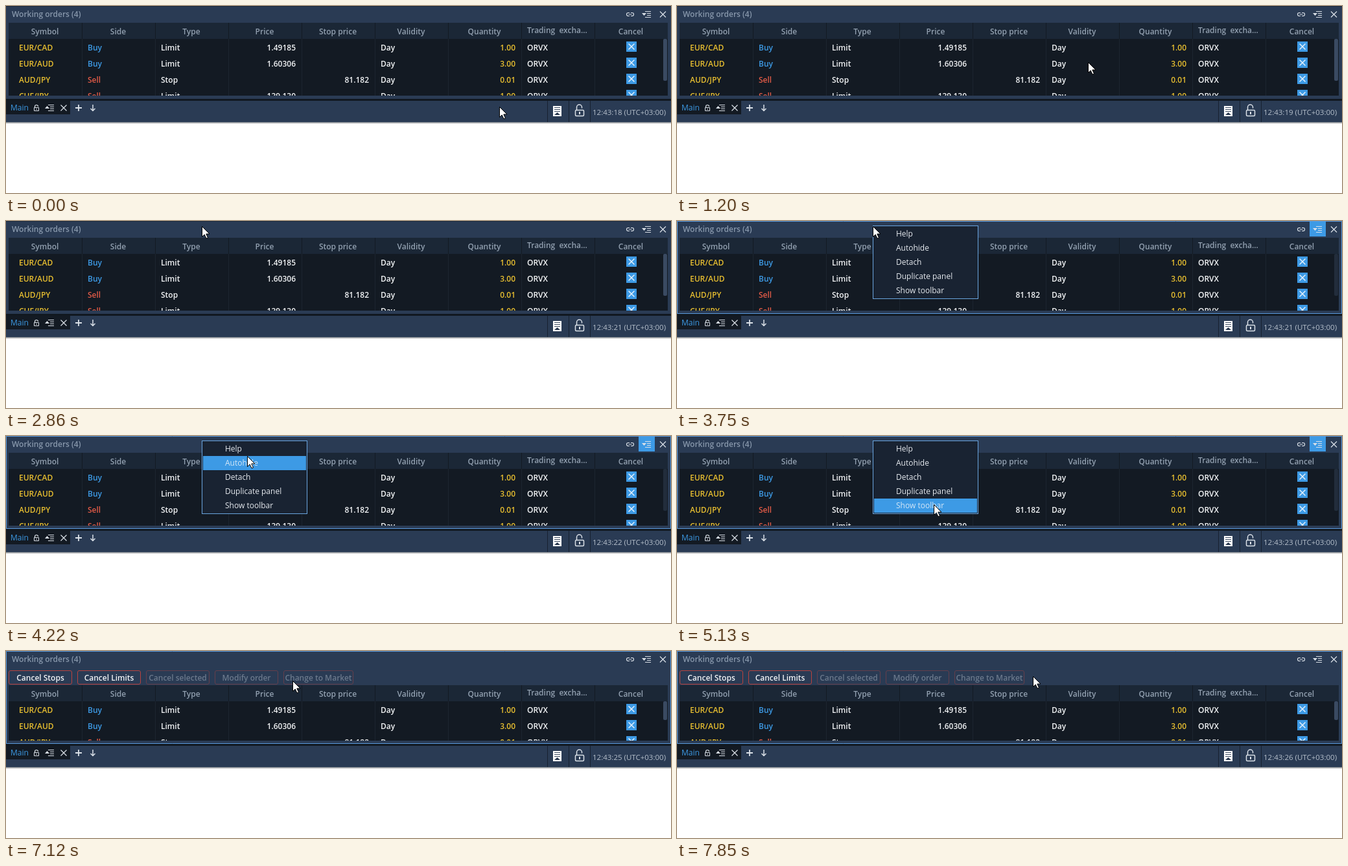
An HTML page with a canvas that plays this animation: 1026 px wide and 290 px high, repeating every 8 s.

```html
<!DOCTYPE html>
<html lang="en">
<head>
<meta charset="utf-8">
<title>Working orders</title>
<style>
  html, body { margin: 0; width: 100%; height: 100%; overflow: hidden; background: #fff; }
  canvas { display: block; }
</style>
</head>
<body>
<canvas id="stage" width="1026" height="290"></canvas>
<script>
const ctx = document.getElementById('stage').getContext('2d');
const LOOP = 8000;
const BOLD = '600 12px "Open Sans", sans-serif';
const REGULAR = '500 12px "Open Sans", sans-serif';
const BAR = '#2a3b54', DARK = '#131a23', HEAD = '#1b2736', BLUE = '#3d9ae5';
const WHITE = '#f2f4f6', YELLOW = '#e8bf30', RED = '#e25b47', ICON = '#dbe1e8';
const TABLE_BOTTOM = 139;

const COLUMNS = ['Symbol', 'Side', 'Type', 'Price', 'Stop price', 'Validity', 'Quantity', 'Trading  excha...', 'Cancel'];
const CELL_X = [20, 126, 239, 447, 560, 578, 786, 804];
const RIGHT_ALIGNED = [3, 4, 6];
const ORDERS = [
  ['EUR/CAD', 'Buy', 'Limit', '1.49185', '', 'Day', '1.00', 'ORVX'],
  ['EUR/AUD', 'Buy', 'Limit', '1.60306', '', 'Day', '3.00', 'ORVX'],
  ['AUD/JPY', 'Sell', 'Stop', '', '81.182', 'Day', '0.01', 'ORVX'],
  ['CHF/JPY', 'Sell', 'Limit', '139.130', '', 'Day', '1.00', 'ORVX']
];
const MENU = ['Help', 'Autohide', 'Detach', 'Duplicate panel', 'Show toolbar'];
const BUTTONS = [
  ['Cancel Stops', 4, 98, true], ['Cancel Limits', 110, 98, true],
  ['Cancel selected', 216, 98, false], ['Modify order', 322, 98, false],
  ['Change to Market', 428, 108, false]
];

// Pointer path: time, x, y
const PATH = [
  [840, 761, 156], [1200, 634, 87], [1640, 510, 34], [2100, 416, 18], [2480, 344, 8],
  [2580, 344, 8], [2700, 302, 8], [3750, 302, 8], [4220, 372, 31], [4540, 383, 57],
  [5130, 396, 106], [6600, 396, 106], [6900, 414, 66], [7370, 474, 24], [7590, 549, 39]
];
const TICKS = [900, 1880, 2860, 3800, 4700, 5620, 6620, 7580];
const FOCUS = 2910, MENU_OPEN = 2940, MENU_CLOSE = 5920, TOOLBAR = 5980, HOVER = 6100;
const TIP_SHOW = 6420, TIP_HIDE = 6600;

function pointerAt(t) {
  const next = PATH.findIndex(p => p[0] > t);
  if (next < 0) return PATH.at(-1).slice(1);
  if (next === 0) return PATH[0].slice(1);
  const a = PATH[next - 1], b = PATH[next], k = (t - a[0]) / (b[0] - a[0]);
  return [1, 2].map(i => Math.round(a[i] + (b[i] - a[i]) * k));
}

function rect(x, y, w, h, color) {
  ctx.fillStyle = color;
  ctx.fillRect(x, y, w, h);
}

function text(str, x, centerY, color, align = 'left', font = BOLD) {
  ctx.font = font;
  ctx.textAlign = align;
  ctx.fillStyle = color;
  ctx.fillText(str, x, centerY + 4);
}

function shape(points, fill, stroke) {
  ctx.beginPath();
  points.forEach(([x, y]) => ctx.lineTo(x, y));
  ctx.closePath();
  if (fill) { ctx.fillStyle = fill; ctx.fill(); }
  if (stroke) { ctx.strokeStyle = stroke; ctx.lineWidth = 1; ctx.stroke(); }
}

function path(d, color = ICON, width = 1.2) {
  ctx.strokeStyle = color;
  ctx.lineWidth = width;
  ctx.stroke(new Path2D(d));
}

function outline(x, y, w, h, radius, color, width = 1) {
  ctx.strokeStyle = color;
  ctx.lineWidth = width;
  ctx.beginPath();
  ctx.roundRect(x, y, w, h, radius);
  ctx.stroke();
}

function cross(x, y, r, color, width) {
  path(`M${x - r} ${y - r}l${2 * r} ${2 * r}M${x + r} ${y - r}l${-2 * r} ${2 * r}`, color, width);
}

// Menu lines with a small triangle; direction 1 points down, -1 points up
function menuIcon(x, y, direction) {
  path(`M${x - 2} ${y - 4}h9M${x + 1} ${y - 1}h6M${x + 1} ${y + 2}h6M${x - 2} ${y + 5}h9`, ICON, 1);
  shape([[x - 7, y - 1.5 * direction], [x, y - 1.5 * direction], [x - 3.5, y + 2.5 * direction]], ICON);
}

function drawTable(offset) {
  const top = 26 + offset, body = top + 25, height = TABLE_BOTTOM - top;
  rect(4, top, 1017, height, DARK);
  rect(4, top, 1017, 25, HEAD);
  ctx.save();
  ctx.beginPath();
  ctx.rect(4, top, 1017, height);
  ctx.clip();
  COLUMNS.forEach((name, i) => {
    const x = 4 + 113 * i;
    if (i) {
      rect(x, top, 1, 25, DARK);
      rect(x, body, 1, height, '#1c2530');
    }
    if (i === 7) text(name, 804, top + 12, '#92a0b0');
    else text(name, x + 56, top + 14, '#92a0b0', 'center');
  });
  ORDERS.forEach((order, r) => {
    const y = body + 14 + 25 * r;
    order.forEach((value, c) => {
      const color = c === 0 || c === 6 ? YELLOW : c === 1 ? (value === 'Buy' ? BLUE : RED) : WHITE;
      text(value, CELL_X[c], y, color, RIGHT_ALIGNED.includes(c) ? 'right' : 'left');
    });
    rect(957, y - 10, 16, 16, BLUE);
    cross(965, y - 2, 4.5, '#e2f0fc', 1.5);
  });
  ctx.restore();
}

function drawScrollbar(offset, dimmed) {
  const y = 51 + offset;
  ctx.fillStyle = dimmed ? '#222d3c' : '#3a4a62';
  ctx.beginPath();
  ctx.roundRect(1014, y, 6, offset ? 29 : 65, 2);
  ctx.fill();
}

function drawTitle(iconActive) {
  text('Working orders (4)', 9, 13, '#8797ab');
  if (iconActive) rect(976, 1, 25, 23, BLUE);
  path('M962 10.5h-2a2.5 2.5 0 0 0 0 5h2M964 10.5h2a2.5 2.5 0 0 1 0 5h-2M960.5 13h5');
  menuIcon(988, 12.5, 1);
  cross(1013.5, 13, 4.5, ICON, 1.2);
}

function drawStatusBar(t) {
  rect(0, 144, 1026, 3, '#111820');
  rect(0, 147, 1026, 33, BAR);
  rect(0, 147, 99, 21, DARK);
  text('Main', 7, 158, BLUE, 'left', REGULAR);
  outline(43.5, 157.5, 7, 5, 0, ICON);
  rect(46.5, 159, 1, 2, ICON);
  path('M44.5 157.5v-1.5a2.5 2.5 0 0 1 5 0');
  menuIcon(67, 157.5, -1);
  cross(89, 158, 4.5, ICON, 1.2);
  path('M107 158h10M112 153v10', ICON, 1.8);
  path('M134 153v9M130.5 159l3.5 3.5l3.5-3.5', ICON, 1.5);
  for (const x of [835, 868, 901]) rect(x, 147, 1, 33, '#172130');

  rect(844, 155, 13, 16, '#fff');
  path('M846 157.5h9M846 160.5h9M846 163.5h9', '#3b4a60', 1);
  shape([[846, 169], [855, 169], [850.5, 165]], '#26354c');

  outline(878.5, 161.5, 13, 9, 1.5, ICON, 1.5);
  path('M880.5 161v-4a4 4 0 0 1 8 0v1.5', ICON, 1.5);
  rect(884, 164, 2, 4, ICON);

  const second = 18 + TICKS.filter(tick => tick <= t).length;
  text(`12:43:${second} (UTC+03:00)`, 905, 165, '#b5bfcb', 'left', '400 11.5px "Open Sans", sans-serif');
  rect(0, 180, 1026, 1, '#8c9198');
  rect(0, 181, 1026, 1, '#b9bbbe');
  rect(0, 182, 1026, 1, '#ececec');
}

function drawToolbar() {
  for (const [label, x, width, enabled] of BUTTONS) {
    outline(x + .5, 30.5, width - 1, 21, 2.5, enabled ? '#b8433f' : '#643f4b');
    text(label, x + width / 2, 42, enabled ? WHITE : '#6b798c', 'center');
  }
}

function drawMenu(active) {
  rect(302, 7, 163, 114, '#6aa5df');
  rect(303, 8, 161, 112, '#192332');
  MENU.forEach((label, i) => {
    const y = 9 + 22 * i;
    if (i === active) rect(304, y, 159, 22, BLUE);
    text(label, 338, y + 11, i === active ? '#d4e7f7' : '#e6eaef', 'left', REGULAR);
  });
}

function drawCellOutline(row) {
  ctx.setLineDash([3, 1]);
  outline(344.5, 78.5 + 25 * row, 111, 23, 0, '#5aa8ec');
  ctx.setLineDash([]);
}

function drawTooltip() {
  rect(350, 73, 98, 25, '#91a6c2');
  shape([[393, 98], [405, 98], [399, 104]], '#91a6c2');
  text('Click to modify', 359, 86, '#18202c', 'left', '11.3px "Liberation Sans", sans-serif');
}

function drawPointer(x, y) {
  ctx.save();
  ctx.translate(x + .5, y + .5);
  shape([[0, 0], [0, 16], [3.7, 12.5], [6.5, 18.5], [9, 17.5], [6.3, 11.5], [11.5, 11.5]], '#fff', '#000');
  ctx.restore();
}

function draw(t) {
  const [px, py] = pointerAt(t);
  const menuOpen = t >= MENU_OPEN && t < MENU_CLOSE;
  const offset = t >= TOOLBAR ? 27 : 0;

  rect(0, 0, 1026, 290, '#fff');
  rect(0, 0, 1026, 144, BAR);
  rect(0, 0, 1026, 1, '#1c2839');
  drawTitle(menuOpen);
  drawTable(offset);
  drawScrollbar(offset, menuOpen);
  drawStatusBar(t);
  if (t >= FOCUS) outline(.5, .5, 1025, 143, 0, '#5b9bde');
  if (offset) drawToolbar();
  if (menuOpen) drawMenu(t >= 3750 ? Math.floor((py - 9) / 22) : -1);

  const row = Math.floor((py - 78) / 25);
  if (t >= HOVER && px < 456 && row >= 0) drawCellOutline(row);
  if (t >= TIP_SHOW && t < TIP_HIDE) drawTooltip();
  drawPointer(px, py);
}

const start = performance.now();
function frame() {
  draw((performance.now() - start) % LOOP);
  requestAnimationFrame(frame);
}
frame();
</script>
</body>
</html>
```
